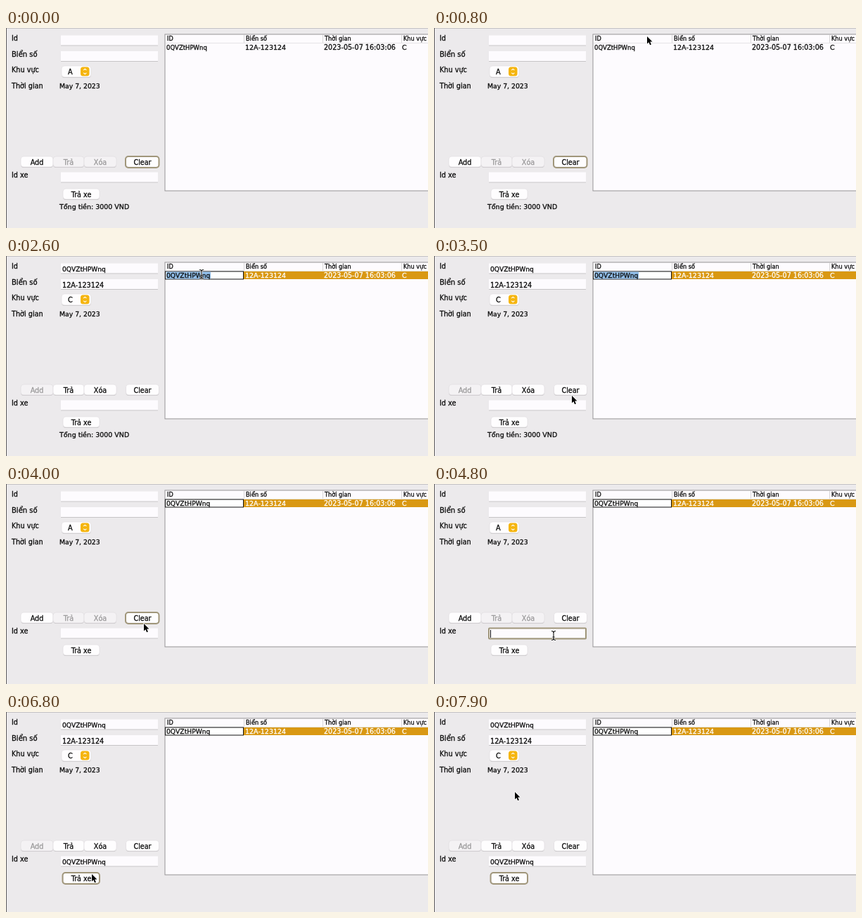
Animation of 600x285 px, one loop 8 s. Source, as an HTML page with a canvas:

```html
<!DOCTYPE html>
<html lang="vi">
<head>
<meta charset="utf-8">
<style>
html, body { margin: 0; width: 100%; height: 100%; overflow: hidden; background: #eceaec; }
canvas { display: block; width: 600px; height: 285px; }
</style>
</head>
<body>
<canvas id="stage" width="600" height="285"></canvas>
<script>
const ctx = document.getElementById('stage').getContext('2d');
const LOOP = 8000, STEP = 100;
const INK = '#0c0c0c', DIM = '#9a999a', RING = '#a0967a', ORANGE = '#d99813';
const ID = '0QVZtHPWnq', PLATE = '12A-123124';

// When each interaction happens, in ms.
const AT = { select: 1300, edit: 1500, highlight: 2200, clear: 3900, focus: 4800, paste: 5200, pay: 6100 };

// Pointer path: time, x, y.
const PATH = [
  [0, 196, 201], [200, 196, 201], [800, 303, 12], [1000, 304, 14],
  [1300, 280, 26], [1800, 278, 26], [2700, 278, 26], [3500, 196, 199],
  [4200, 196, 199], [4600, 170, 216], [5200, 170, 216], [5700, 122, 231],
  [7100, 122, 231], [7600, 118, 146], [7900, 115, 114]
];

function pointerAt(t) {
  const i = PATH.findIndex(p => p[0] >= t);
  if (i <= 0) return PATH[0].slice(1);
  const [t0, x0, y0] = PATH[i - 1], [t1, x1, y1] = PATH[i];
  const u = (t - t0) / (t1 - t0), k = u * u * (3 - 2 * u);
  return [x0 + (x1 - x0) * k, y0 + (y1 - y0) * k];
}

function rect(x, y, w, h, color) {
  ctx.fillStyle = color;
  ctx.fillRect(x, y, w, h);
}

// A hairline stroke gives the letters a medium weight.
function text(s, x, y, size = 9.7, color = INK, align = 'left') {
  ctx.font = `${size}px "DejaVu Sans", sans-serif`;
  ctx.textAlign = align;
  ctx.fillStyle = ctx.strokeStyle = color;
  ctx.lineWidth = 0.3;
  ctx.fillText(s, x, y);
  ctx.strokeText(s, x, y);
}

function rounded(x, y, w, h, r, fill, stroke, line = 1) {
  ctx.beginPath();
  ctx.roundRect(x, y, w, h, r);
  if (fill) { ctx.fillStyle = fill; ctx.fill(); }
  if (stroke) { ctx.strokeStyle = stroke; ctx.lineWidth = line; ctx.stroke(); }
}

function field(y, value, size, focused) {
  rect(78, y, 138, 15, '#fdfbfe');
  rect(78, y + 14, 138, 1, '#c6c4c6');
  if (focused) rounded(78, y, 138, 15, 1, null, RING, 2);
  text(value, 80, y + 11.5, size);
}

function button(label, x, y, w, enabled = true, focused = false) {
  rounded(x, y + 1, w, 15, 4, '#cbc9cb');
  rounded(x, y, w, 15, 4, enabled ? '#fefdfe' : '#f4f2f4', '#dddbdd', 0.6);
  if (focused) rounded(x - 0.5, y, w + 0.5, 16, 4, null, RING, 2);
  text(label, x + w / 2, y + 11.5, 9.6, enabled ? INK : DIM, 'center');
}

function combo(value) {
  rounded(79, 55, 42, 16, 4, '#cccacc');
  rounded(79, 54, 42, 16, 4, '#fefdfe', '#dddbdd', 0.6);
  rounded(106, 55.5, 12.5, 13, 3.5, '#f5b50f');
  text(value, 88, 66);
  ctx.strokeStyle = '#fff';
  ctx.lineWidth = 1.1;
  ctx.beginPath();
  for (const d of [-1, 1]) {
    ctx.moveTo(110.2, 62 + d * 1.8);
    ctx.lineTo(112.3, 62 + d * 3.7);
    ctx.lineTo(114.4, 62 + d * 1.8);
  }
  ctx.stroke();
}

function table(selected, editing, highlighted) {
  rect(225.5, 8.5, 375, 224, '#969496');
  rect(226.5, 9.5, 374, 222, '#fdfbfe');
  const heads = ['ID', 'Biển số', 'Thời gian', 'Khu vực'];
  [229, 341, 453, 565].forEach((x, i) => {
    text(heads[i], x, 18, 8.2);
    if (i) rect(x - 3, 10, 1, 11, '#d9d7d9');
  });
  rect(227, 21, 373, 1, '#e6e4e6');

  if (selected) rect(227, 22, 373, 11, ORANGE);
  const color = selected ? '#fff' : INK;
  text(PLATE, 340, 31, 9.5, color);
  text('2023-05-07 16:03:06', 452, 31, 9.6, color);
  text('C', 563, 31, 9.5, color);
  if (!editing) {
    text(ID, 228, 31, 8.5, color);
    return;
  }
  rect(226, 21.5, 112, 12, '#111');
  rect(227, 22.5, 110, 10, '#fff');
  if (highlighted) rect(228, 22.5, 63, 10, '#8fbce8');
  text(ID, 228, 31, 9.2);
}

function arrow(x, y) {
  ctx.beginPath();
  const outline = [[0, 0], [0, 10.5], [2.4, 8.3], [4.1, 12.2], [5.9, 11.4], [4.2, 7.6], [7.5, 7.4]];
  outline.forEach(([dx, dy]) => ctx.lineTo(x + dx, y + dy));
  ctx.closePath();
  ctx.lineJoin = 'round';
  ctx.strokeStyle = '#fff';
  ctx.lineWidth = 1.6;
  ctx.stroke();
  ctx.fillStyle = '#000';
  ctx.fill();
}

function beam(x, y) {
  ctx.beginPath();
  for (const d of [-1, 1]) {
    ctx.moveTo(x - 3, y + d * 6.5);
    ctx.quadraticCurveTo(x, y + d * 6.5, x, y + d * 4);
    ctx.quadraticCurveTo(x, y + d * 6.5, x + 3, y + d * 6.5);
  }
  ctx.moveTo(x, y - 4);
  ctx.lineTo(x, y + 4);
  ctx.moveTo(x - 1.5, y + 2);
  ctx.lineTo(x + 1.5, y + 2);
  for (const [color, width] of [['#fff', 2.6], ['#111', 1.1]]) {
    ctx.strokeStyle = color;
    ctx.lineWidth = width;
    ctx.stroke();
  }
}

function draw(t) {
  const within = (a, b) => t >= a && t < b;
  const loaded = within(AT.select, AT.clear) || t >= AT.pay;
  const clearFocused = t < AT.select || within(AT.clear, AT.focus);
  const payFocused = t >= AT.pay;
  const idFocused = within(AT.focus, AT.pay);

  rect(0, 0, 600, 285, '#eceaec');
  rect(0, 0, 600, 1, '#c4c2c4');
  rect(0, 0, 1, 285, '#5c5a5c');

  text('Id', 8, 18);
  text('Biển số', 8, 41, 10);
  text('Khu vực', 8, 63);
  text('Thời gian', 8, 86);
  text('May 7, 2023', 76, 86, 9.3);
  text('Id xe', 8, 213);

  field(10.5, loaded ? ID : '', 9.1);
  field(33, loaded ? PLATE : '', 9.7);
  combo(loaded ? 'C' : 'A');

  button('Add', 21, 183, 46, !loaded);
  button('Trả', 67, 183, 44, loaded);
  button('Xóa', 111, 183, 46, loaded);
  button('Clear', 170.5, 183, 47, true, clearFocused);

  field(205.5, t >= AT.paste ? ID : '', 9.1, idFocused);
  if (within(AT.focus, AT.paste)) rect(80, 208, 1, 11, '#111');
  button('Trả xe', 81, 229, 52, true, payFocused);
  if (t < AT.clear) text('Tổng tiền: 3000 VND', 76, 258, 9.5);

  table(t >= AT.select, t >= AT.edit, within(AT.highlight, AT.clear));

  if (t >= STEP) {
    const overText = within(AT.edit, 2800) || within(4600, 5300);
    (overText ? beam : arrow)(...pointerAt(t));
  }
}

function tick(now) {
  draw(Math.floor((now % LOOP) / STEP) * STEP);
  requestAnimationFrame(tick);
}
draw(0);
requestAnimationFrame(tick);
</script>
</body>
</html>
```
